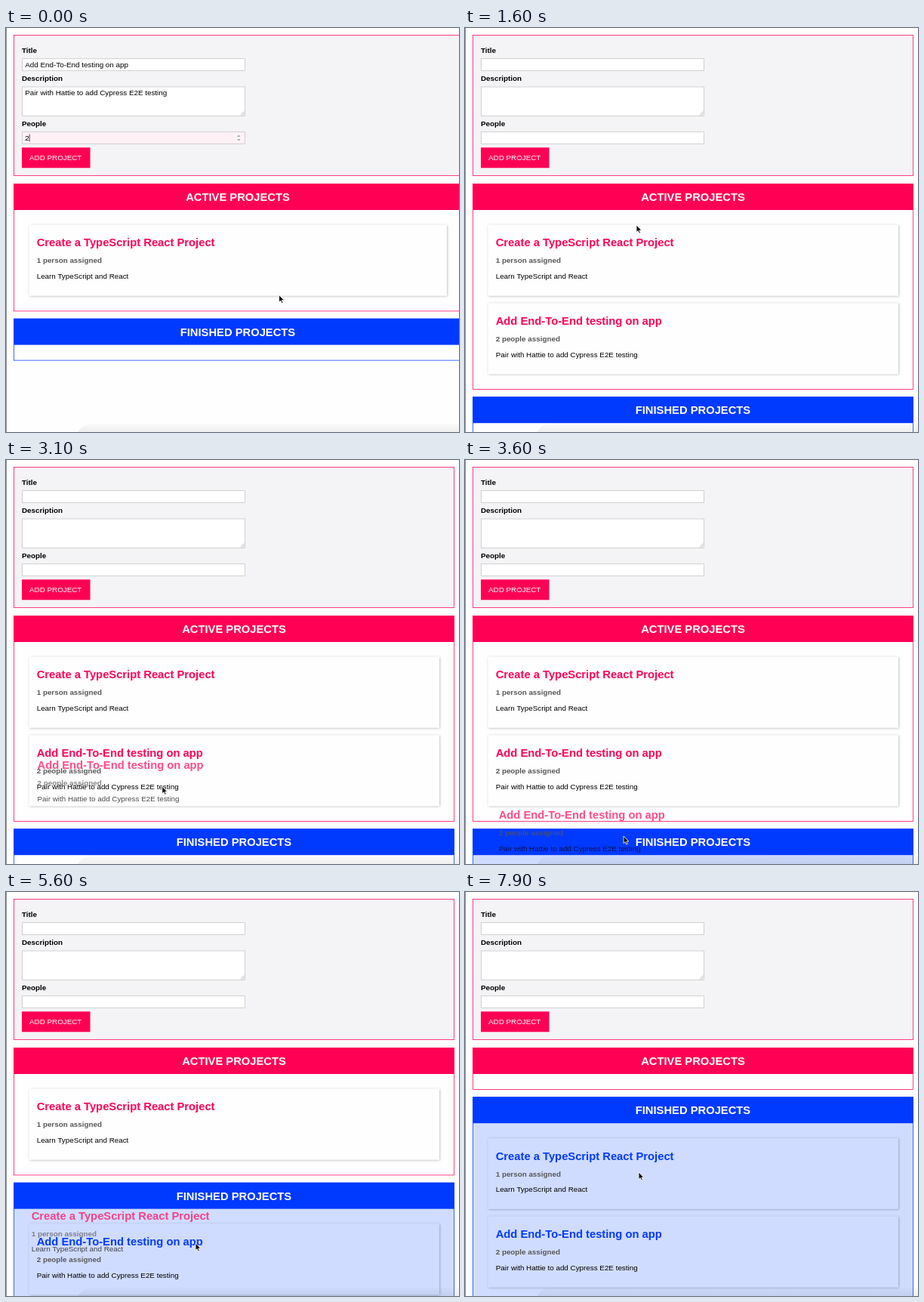
Write an HTML page that moves like this. It is 600 by 535 pixels and loops after 8000 ms.

```html
<!DOCTYPE html>
<html lang="en">
<head>
<meta charset="utf-8">
<title>Project board</title>
<style>
  html, body { margin: 0; width: 100%; height: 100%; overflow: hidden; background: #fefefe; }
  svg { display: block; width: 100%; height: 100%; font: 9.83px "Liberation Sans", Arial, sans-serif; }
  .b { font-weight: bold; }
  .h { font-weight: bold; font-size: 14.75px; }
  .c { text-anchor: middle; }
</style>
</head>
<body>
<svg viewBox="0 0 600 535" xmlns="http://www.w3.org/2000/svg">
  <defs>
    <filter id="shadow" x="-5%" y="-15%" width="110%" height="130%">
      <feDropShadow dx=".6" dy=".6" stdDeviation="1.8" flood-opacity=".3"/>
    </filter>
    <linearGradient id="dock" x1="0" y1="0" x2="0" y2="1">
      <stop offset="0" stop-color="#000" stop-opacity=".015"/>
      <stop offset="1" stop-color="#000" stop-opacity=".06"/>
    </linearGradient>
  </defs>
  <g id="page"></g>
  <path d="M95 535Q101 524 116 524H600V535Z" fill="url(#dock)"/>
  <path id="cursor" d="M0 0V9.6L2.2 7.6L3.7 11L5.4 10.3L3.9 7H6.9Z"
        fill="#111" stroke="#fff" stroke-width=".8" stroke-linejoin="round"/>
</svg>
<script>
const LOOP = 8000, STEP = 100;
const PINK = '#ff0055', BLUE = '#0039ff', DROP_BG = '#d0dcff';
const SUBMIT = 1000, BLUR = 900;
const page = document.getElementById('page');
const cursor = document.getElementById('cursor');

const learn = { title: 'Create a TypeScript React Project', people: '1 person assigned', text: 'Learn TypeScript and React' };
const testing = { title: 'Add End-To-End testing on app', people: '2 people assigned', text: 'Pair with Hattie to add Cypress E2E testing' };

// Pointer stops: time, x, y
const path = [
  [0, 361.5, 353.5], [200, 361.5, 353.5], [800, 70, 173], [1050, 70, 173],
  [1600, 227, 261], [1800, 227, 263], [2500, 207, 420], [2800, 207, 420],
  [2900, 206, 416], [3600, 210, 498], [3900, 214, 513], [4200, 214, 513],
  [4900, 258, 321], [5000, 258, 321], [5600, 251, 465], [6200, 251, 465],
  [7100, 230, 371], [LOOP, 230, 371]
];
const drags = [
  { card: testing, from: 2900, to: 4000, top: 364.5 },
  { card: learn, from: 5000, to: 5700, top: 261 }
];

function pointerAt(t) {
  const i = Math.max(1, path.findIndex(p => p[0] > t));
  const [t0, x0, y0] = path[i - 1], [t1, x1, y1] = path[i];
  const u = (t - t0) / (t1 - t0), k = u * u * (3 - 2 * u);
  return [x0 + (x1 - x0) * k, y0 + (y1 - y0) * k];
}

const rect = (x, y, w, h, fill, more = '') =>
  `<rect x="${x}" y="${y}" width="${w}" height="${h}" fill="${fill}" ${more}/>`;
const text = (x, y, s, cls = '', fill = '#000') =>
  `<text x="${x}" y="${y}" class="${cls}" fill="${fill}">${s}</text>`;
const line = (d, color, width = .8) =>
  `<path d="${d}" fill="none" stroke="${color}" stroke-width="${width}"/>`;
const outline = color => `stroke="${color}" stroke-width=".75"`;

const field = (y, h, value, fill = '#fff') =>
  rect(21.5, y, 295, h, fill, outline('#c4c4c4')) + text(25.3, y + 11.3, value);

const cardText = (x, top, card, color) =>
  text(x, top + 28.5, card.title, 'h', color) +
  text(x, top + 50.5, card.people, 'b', '#575757') +
  text(x, top + 71.3, card.text);

function form(right, filled, focused) {
  return rect(10.5, 9.5, right - 10.5, 186, '#f4f3f5', outline(PINK)) +
    text(21, 33.3, 'Title', 'b') + field(40.7, 15.6, filled ? testing.title : '') +
    text(21, 70.3, 'Description', 'b') + field(78, 38.5, filled ? testing.text : '') +
    line('M311 115.5L315.7 110.8M313.6 115.5L315.7 113.4', '#888', .7) +
    text(21, 130.3, 'People', 'b') +
    field(137.7, 15.6, filled ? '2' : '', focused ? '#fff0f6' : '#fff') +
    (focused
      ? line('M31.2 140.5V150.5', '#222') + rect(305.3, 140.3, 6, 10.6, '#f7f7f7', 'rx="1.5"') +
        line('M306.8 144.2L308.3 142.3L309.8 144.2M306.8 147L308.3 148.9L309.8 147', '#555')
      : '') +
    rect(21, 158.3, 90.5, 27, PINK) + text(31, 175.3, 'ADD PROJECT', '', '#fff');
}

const sectionHeight = n => 55 + (n ? 10 + n * 103.6 - .2 - 10 + 10 : 0);

function section(top, right, label, cards, color, bg) {
  const h = sectionHeight(cards.length);
  return rect(10.5, top + .3, right - 10.5, h, bg, outline(color)) +
    rect(10.2, top, right - 9.9, 34.8, color) +
    text((10.5 + right) / 2, top + 22.8, label, 'h c', '#fff') +
    cards.map((card, i) => {
      const y = top + 54.7 + i * 103.6;
      return rect(30.7, y, right - 50.3, 93.6, bg, 'filter="url(#shadow)"') + cardText(40.7, y, card, color);
    }).join('');
}

function draw(t) {
  const [x, y] = pointerAt(t);
  const submitted = t >= SUBMIT;
  const right = submitted ? 593.5 : 603.5;
  const all = submitted ? [learn, testing] : [learn];
  const isDone = card => drags.some(d => d.card === card && t >= d.to);
  const active = all.filter(card => !isDone(card)), done = all.filter(isDone);
  const finishedTop = 206.2 + sectionHeight(active.length) + 10.2;
  const drag = drags.find(d => t >= d.from && t < d.to);
  const highlighted = done.length > 0 || (drag && y > finishedTop);

  let out = rect(0, 0, 600, 535, '#fefefe') + rect(0, 0, 1, 535, '#8a8a8e') +
    form(right, !submitted, t < BLUR) +
    section(206.2, right, 'ACTIVE PROJECTS', active, PINK, '#fefefe') +
    section(finishedTop, right, 'FINISHED PROJECTS', done, BLUE, highlighted ? DROP_BG : '#fefefe');
  if (drag) {
    const [x0, y0] = pointerAt(drag.from);
    out += `<g opacity=".7">${cardText(40.7 + x - x0, drag.top + y - y0, drag.card, PINK)}</g>`;
  }
  page.innerHTML = out;
  cursor.setAttribute('transform', `translate(${x} ${y})`);
}

let last = -1;
function tick() {
  const t = Math.floor(performance.now() % LOOP / STEP) * STEP;
  if (t !== last) draw(last = t);
  requestAnimationFrame(tick);
}
tick();
</script>
</body>
</html>
```
